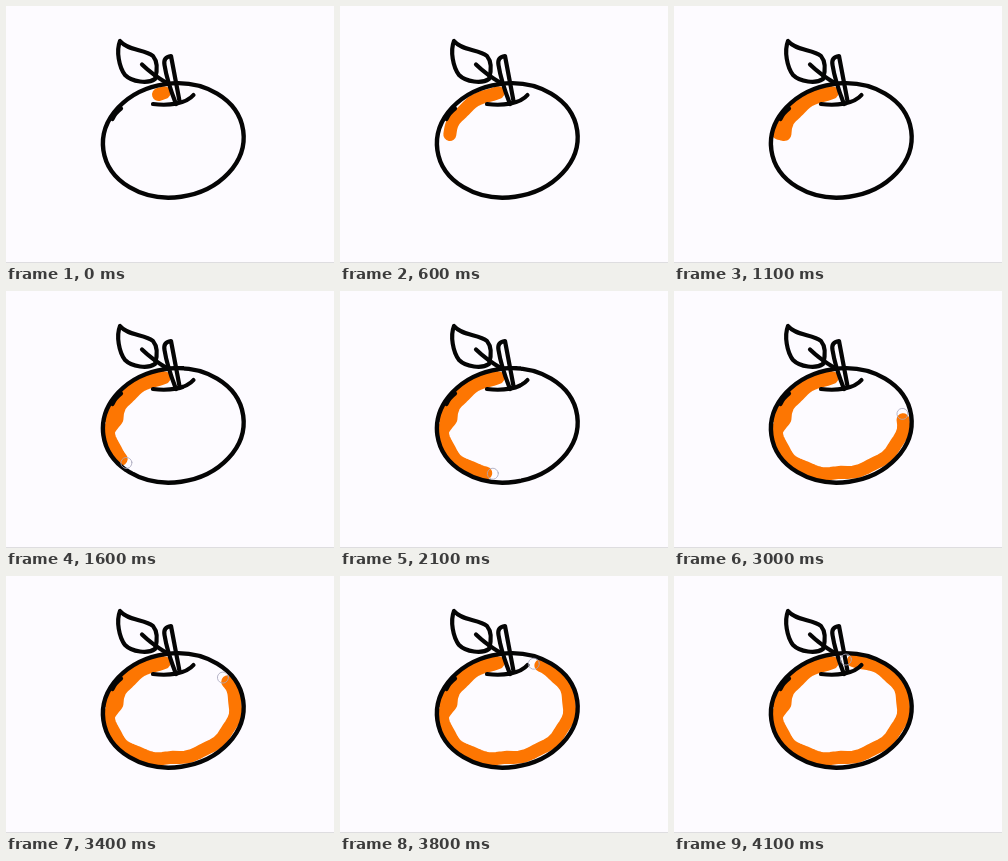
Animation, 328 px wide and 257 px high, one loop 4.2 s. Source, as an HTML page:

```html
<!DOCTYPE html>
<html lang="en">
<head>
<meta charset="utf-8">
<title>Colouring an orange</title>
<style>
  html, body { margin: 0; width: 100%; height: 100%; overflow: hidden; background: #fdfbff; }
  svg { display: block; width: 328px; height: 257px; }
  svg * { stroke-linecap: round; stroke-linejoin: round; }
</style>
</head>
<body>
<svg viewBox="0 0 328 257" fill="none">
  <defs>
    <ellipse id="rim" rx="70.600" ry="56.900"/>
    <clipPath id="inside"><use href="#rim"/></clipPath>
  </defs>
  <path d="M0 256.500H328" stroke="#dedde0"/>
  <g transform="translate(167.300 134.400) rotate(-8)">
    <g clip-path="url(#inside)">
      <polyline id="paint" stroke="#fd7602" stroke-width="13"/>
    </g>
    <use href="#rim" stroke="#050505" stroke-width="4.400"/>
  </g>
  <g stroke="#050505" stroke-width="4.200">
    <path d="M106.500 113Q109 107 115 102.500"/>
    <path d="M114 35C110 45 113 61 119 69C126 76 142 78 149 73C151 66 152 56 147 50C139 43 122 45 114 35Z"/>
    <path d="M136 58.500Q147 69 160 76.500"/>
    <path d="M173.500 95L165 50Q157 51 158.500 59Q161 75 170 98"/>
    <path d="M147 98C162 100 180 98 187.500 89"/>
  </g>
  <g transform="translate(167.300 134.400) rotate(-8)">
    <circle id="cursor" r="5.500" stroke="#a9a8bd" stroke-width=".8"/>
  </g>
</svg>
<script>
const LOOP = 4200, STEP = 100;
const RX = 70.6, RY = 56.9;

// Brush turns: step, angle anticlockwise from the top, distance inside the rim
const turns = [
  [-0.5, 0.04, 8], [6, 1.26, 11], [7, 1.25, 5], [9, 0.1, 5], [11, 1.25, 12], [13, 1.5, 6],
  [16, 2.1, 6], [24, 3.03, 9.5], [26, 3.03, 9.5], [30, 4.65, 8], [34, 5.14, 7], [42, 6.1, 7]
];

const paint = document.getElementById("paint");
const cursor = document.getElementById("cursor");

function brushAt(step) {
  const next = Math.max(1, turns.findIndex(turn => turn[0] >= step));
  const from = turns[next - 1], to = turns[next];
  const k = (step - from[0]) / (to[0] - from[0]);
  const angle = from[1] + (to[1] - from[1]) * k;
  const inset = from[2] + (to[2] - from[2]) * k + 0.7 * Math.sin(angle * 11);
  return [-(RX - inset) * Math.sin(angle), -(RY - inset) * Math.cos(angle)];
}

function draw(now) {
  const step = Math.floor(now % LOOP / STEP);
  const points = [];
  for (let s = turns[0][0]; s <= step; s += 0.25) points.push(brushAt(s));
  paint.setAttribute("points", points.join(" "));

  // The cursor runs one step ahead of the paint
  const [x, y] = brushAt(step + 1);
  cursor.setAttribute("cx", x);
  cursor.setAttribute("cy", y);
  cursor.setAttribute("visibility", step < 13 ? "hidden" : "visible");
}

const start = performance.now();
function tick() {
  draw(performance.now() - start);
  requestAnimationFrame(tick);
}
tick();
</script>
</body>
</html>
```
